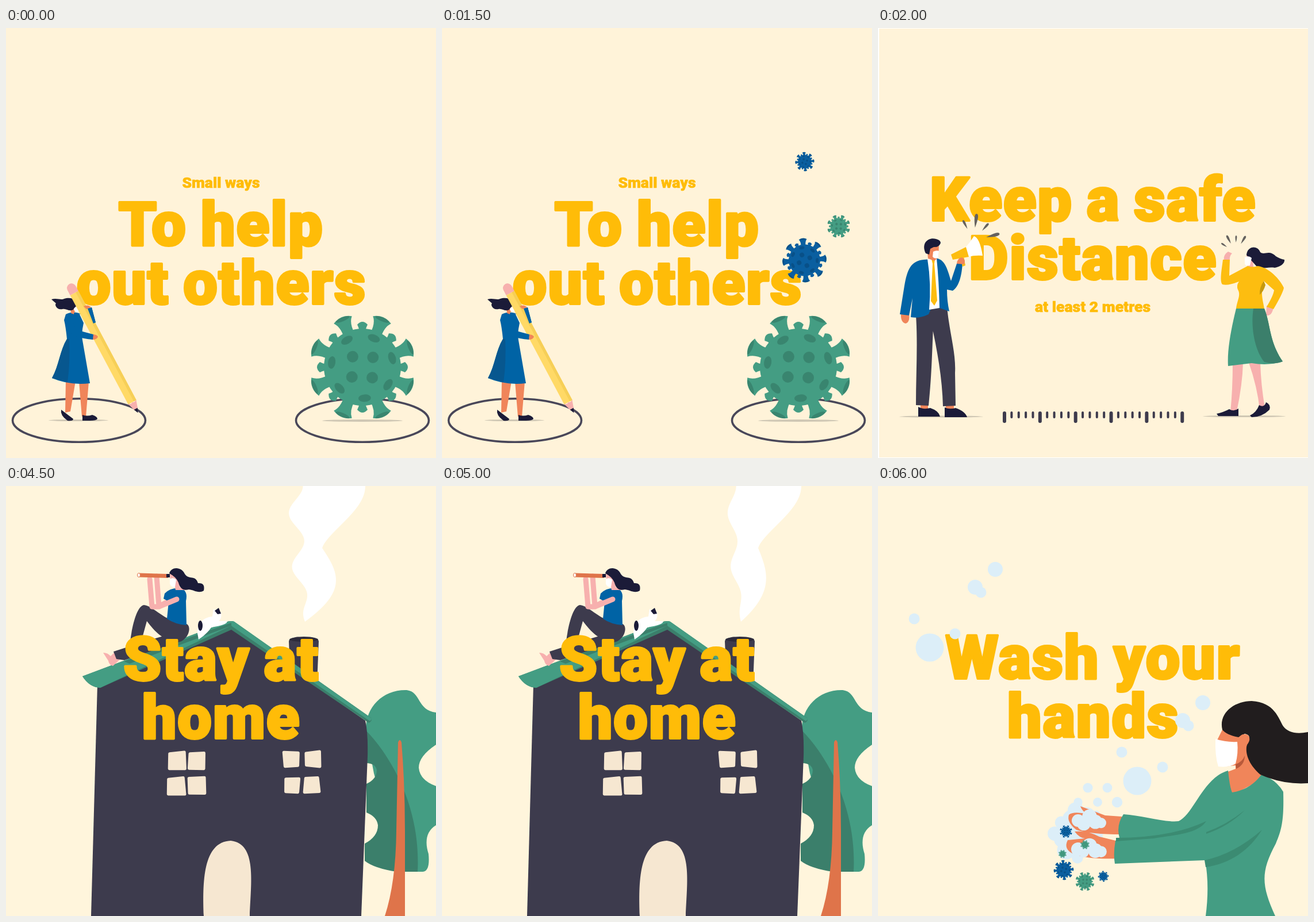
An HTML page that plays this animation: 748x748 px, repeating every 8000 ms.

```html
<!DOCTYPE html>
<html lang="en">
<head>
<meta charset="utf-8">
<title>Small ways to help out others</title>
<style>
html, body { margin: 0; width: 100%; height: 100%; overflow: hidden; background: #fff3d9 }
svg { display: block; width: 100vw; height: 100vh }
text { font: 900 106px Roboto, sans-serif; letter-spacing: 1.8px; word-spacing: -4px; text-anchor: middle;
  fill: #ffbc08; stroke: #ffbc08; stroke-width: 4; stroke-linejoin: round }
.small { font-size: 26.5px; stroke-width: .7; letter-spacing: 0; word-spacing: 0 }
.n { fill: #1b1b38 } .b { fill: #0063a5 } .B { fill: #07578f } .g { fill: #449d83 } .G { fill: #3b7f6b }
.k { fill: #3d3b4d } .o { fill: #f0855a } .p { fill: #f7b0ae } .w { fill: #fff } .y { fill: #fdbd10 }
.s { fill: #cfc7b4 } .c { fill: #f6e7d1; stroke: #f6e7d1; stroke-width: 5; stroke-linejoin: round }
.foam { fill: #dceef8 } .ring { fill: none; stroke: #494759; stroke-width: 3.6 } .ray { fill: #65625f }
.blue { color: #0a5fa0 } .green { color: #449d83 }
.arm { fill: none; stroke: #f7b0ae; stroke-width: 9; stroke-linejoin: round; stroke-linecap: round }
</style>
</head>
<body>
<svg viewBox="0 0 748 748">
<defs>
  <g id="virus"></g>
  <g id="drift" class="foam">
    <circle r="24.5"/>
    <circle cx="44" cy="-24" r="9.5"/>
    <circle cx="-27" cy="-50" r="9.5"/>
    <circle cx="79" cy="-105" r="13"/>
    <circle cx="89" cy="-96" r="9.5"/>
    <circle cx="114" cy="-136" r="13"/>
  </g>
</defs>

<g class="scene">
  <rect width="748" height="748" fill="#fff3d9"/>
  <text class="small" x="374" y="277.5">Small ways</text>
  <text x="374" y="378">To help</text>
  <text x="375" y="480">out others</text>
  <ellipse class="ring" cx="127" cy="682.5" rx="115.5" ry="37.8"/>
  <ellipse class="ring" cx="620" cy="682.5" rx="115.5" ry="37.8"/>
  <ellipse class="s" cx="126" cy="682.5" rx="52" ry="1.6"/>
  <ellipse class="s" cx="620" cy="683" rx="70" ry="2"/>
  <path class="o" d="M104 614H121L112 667L103 669ZM127 615H144L139 676H132Z"/>
  <path class="n" d="M96 664L117 680Q117 684 107 683Q94 674 96 664ZM133 673Q141 676 150 673Q159 676 159 680Q157 683 146 683H133Z"/>
  <path class="B" d="M127 497L149 486L156 513L141 503Z"/>
  <path class="b" d="M104 498Q115 492 127 496L135 513Q131 530 133 543L146 618Q110 622 80 609C92 588 94 560 106 541Q104 520 101 508Z"/>
  <path class="B" d="M106 541C94 560 92 588 80 609L107 616Q112 580 110 541Z"/>
  <path class="o" d="M112 485H126V491L119 494L118 498L113 496Z"/>
  <path class="w" d="M117 487Q123 483 129 486L127 493Q121 495 119 492Z"/>
  <path class="n" d="M79 472C88 469 96 474 101 471C112 467 127 472 128 483Q121 482 117 490C109 494 105 487 98 489C88 491 84 481 87 479Z"/>
  <g transform="translate(229.5 669.5) rotate(-28)">
    <path fill="#ffd966" d="M-8-21V-236H8V-21Z"/>
    <path fill="#f6cf57" d="M3-21V-236H8V-21Z"/>
    <path class="p" d="M-8-236V-246A8 8 0 0 1 8-246V-236ZM-8-22Q-4-18 0-21Q4-18 8-22L3-6H-3Z"/>
    <path class="n" d="M-3.5-8H3.5L0 0Z"/>
  </g>
  <path class="o" d="M135 484Q143 480 148 486L140 489ZM150 533Q158 533 160 537Q158 543 149 542Z"/>
  <path class="b" d="M142 488L149 486L156 512L152 514ZM103 502C112 500 118 515 122 525L152 533L151 542Q118 539 110 529Z"/>
  <use href="#virus" class="green" transform="translate(620 590)"/>
  <use href="#virus" class="pop blue" transform="translate(630.5 404) rotate(18) scale(.41)"/>
  <use href="#virus" class="pop green" transform="translate(690 345) scale(.215)"/>
  <use href="#virus" class="pop blue" transform="translate(631 232.5) rotate(18) scale(.178)"/>
</g>

<g class="scene">
  <rect width="748" height="748" fill="#fff"/>
  <rect x="2" y="1" width="746" height="746" fill="#fff3d9"/>
  <text x="374" y="335">Keep a safe</text>
  <text x="374" y="437">Distance</text>
  <text class="small" x="373.5" y="494">at least 2 metres</text>
  <g id="rays"></g>
  <g id="ruler" stroke="#3d3b4d" stroke-linecap="round"></g>
  <ellipse class="s" cx="110" cy="676" rx="73" ry="1.6"/>
  <ellipse class="s" cx="637" cy="675.5" rx="72" ry="1.6"/>
  <path class="o" d="M74 655H87V664H74ZM118 655H132V664H118ZM40 497H54Q56 512 48 514Q39 512 40 497Z"/>
  <path class="k" d="M65 488H98C94 540 95 590 88 657L66 656C66 600 70 540 65 488ZM90 487L120 484C124 530 136 565 134 600L135 657L113 658C112 610 103 560 92 510Z"/>
  <path class="n" d="M70 659Q78 664 91 661Q106 666 108 676H70ZM116 660Q124 664 135 661Q152 667 155 677H116Z"/>
  <path class="b" d="M80 403C57 405 51 420 46 448L38 498L54 500L60 470L57 503Q72 506 88 498L92 489L107 487L124 493Q120 475 120 455L130 457C141 450 146 430 147 408L137 410L127 440C121 420 117 405 104 401Z"/>
  <path class="w" d="M86 402L102 401Q106 440 107 487L89 490Q93 445 86 402Z"/>
  <path class="y" d="M93 402H99L98 410L103 474L98 483L92 475L95 410Z"/>
  <path class="o" d="M85 378H106L105 399L98 405L87 401Z"/>
  <path class="n" d="M83 392C74 373 89 363 101 367Q109 369 109 374Q106 382 97 381L91 384L89 394Z"/>
  <path class="w" d="M96 389Q102 386 106 388L105 400Q98 402 95 398ZM152 382Q160 373 167 362Q177 365 182 396Q168 395 157 398Z"/>
  <path class="y" d="M127 394L153 381L158 398L130 403ZM143 399L149 397L152 413L147 415Z"/>
  <path class="o" d="M137 410Q138 400 146 399Q153 402 150 411Z"/>
  <path class="p" d="M617 582H635Q634 620 624 667L613 668Q617 630 617 582ZM645 582H665Q666 620 673 661L664 664Q660 625 645 582ZM602 405Q600 395 609 389L616 392Q611 396 612 405ZM676 483L688 486Q685 502 675 500ZM641 395H652L653 418H643Z"/>
  <path class="n" d="M589 671Q602 668 611 663Q619 668 627 662V675H592ZM647 674Q658 669 663 656Q672 661 675 651Q684 655 681 664Q668 677 650 677Z"/>
  <path class="n" d="M641 395C642 379 660 377 665 390C672 396 680 385 692 397Q700 402 707 403C708 411 697 416 690 417C675 415 665 422 658 414Z"/>
  <path class="w" d="M638 399Q645 395 650 400L647 413Q640 415 638 410Z"/>
  <path class="y" d="M643 414Q652 417 660 414C680 416 700 438 706 452Q704 462 688 489L676 485Q688 465 689 456L671 440C664 462 671 478 672 489H623C624 475 632 465 626 455Q623 448 628 441Q608 449 599 446C594 440 598 420 600 403H612L611 431Z"/>
  <path fill="#c6990f" d="M671 440L674 447Q671 458 664 464Q663 452 671 440Z"/>
  <path class="g" d="M623 488H672C683 515 680 545 704 580Q680 588 650 583L609 588C607 560 615 520 623 488Z"/>
  <path class="G" d="M653 488H672C683 515 680 545 704 580Q690 586 672 581C655 560 648 520 653 488Z"/>
</g>

<g class="scene">
  <rect width="748" height="748" fill="#fff5dc"/>
  <path class="g" d="M626 425C625 385 655 354 697 355C722 358 715 390 748 394V450Q718 470 718 490Q720 512 748 522V590Q724 605 735 640Q738 670 725 671H690L640 500Z"/>
  <path class="G" d="M716 671H680Q640 665 624 652V622Q647 610 647 590Q645 575 627 568V518Q645 510 645 494Q643 483 628 482L626 425C670 470 722 560 716 671Z"/>
  <path fill="#df744a" d="M682 446Q685 438 688 446Q694 520 694 600V748H659Q678 690 679 600Z"/>
  <path id="smoke" class="w"/>
  <path class="k" d="M492 270Q493 262 518 262Q543 262 544 270L541 345L494 315Z"/>
  <ellipse cx="518" cy="267" rx="25" ry="4" fill="#2d2b3b"/>
  <path class="k" d="M159 346L391 245L625 408Q630 430 629 470L618 748H148Z"/>
  <path class="G" d="M133 331L385 236Q393 234 397 236L636 404Q637 409 631 412L392 250L164 351Q145 350 133 331Z"/>
  <path class="g" d="M133 331L388 235L394 242L164 351Q145 350 133 331ZM388 236Q394 234 397 236L637 405L633 409L393 244Z"/>
  <path class="G" d="M205 305L340 256L392 238V243L215 309Z"/>
  <path id="panes" class="c"/>
  <path fill="#f6e7d1" d="M344 748C342 690 342 619 391 617C437 622 426 690 424 748Z"/>
  <path class="p" d="M169 290Q177 290 182 296L190 288L198 302L186 313Q179 311 178 304Z"/>
  <path class="k" d="M284 258L305 270L206 303L192 301L187 288Q235 272 284 258Z"/>
  <path class="k" d="M281 230L314 240C322 243 320 262 305 270C285 275 265 262 245 235L234 275L216 270C220 240 228 209 240 207C252 208 268 224 281 230Z"/>
  <path class="arm" d="M250 162L254 210H266M262 157L266 209L294 195"/>
  <path d="M231 155L282 156.5" stroke="#df744a" stroke-width="7"/>
  <path class="n" d="M279 153H285V159H279Z"/>
  <ellipse class="w" cx="231" cy="155" rx="2.5" ry="3.5" stroke="#df744a"/>
  <path class="b" d="M276 187Q286 176 305 178Q317 183 313 200L314 242Q295 241 280 231L283 201L274 196Z"/>
  <path class="arm" d="M268 209L297 197"/>
  <path class="p" d="M285 153L300 156L302 176L313 181H295L294 176L287 172Z"/>
  <path class="n" d="M284 152C288 139 306 141 311 153C318 164 330 154 334 169Q347 168 344 182C335 188 325 180 318 180Q304 184 300 168Q296 158 284 152Z"/>
  <path class="w" d="M285 162Q291 158 296 163L294 176Q287 176 285 170Z"/>
  <path class="w" d="M333 256Q333 230 359 227L361 214L374 220Q376 230 370 235H384Q388 241 357 246Q350 257 335 267Z"/>
  <path class="n" d="M363 217L370 212L374 222L368 223Z"/>
  <ellipse class="n" cx="338" cy="243" rx="4" ry="9"/>
  <text x="374.5" y="338">Stay at</text>
  <text x="374.5" y="438.5">home</text>
</g>

<g class="scene">
  <rect width="748" height="748" fill="#fff5dc"/>
  <text x="374" y="335">Wash your</text>
  <text x="374.5" y="436.5">hands</text>
  <use href="#drift" x="90" y="281"/>
  <use href="#drift" x="451" y="513"/>
  <g id="suds" class="foam"></g>
  <path class="o" d="M424 575L395 573L352 557Q355 566 365 571Q340 565 332 572Q328 585 345 598Q370 606 424 606ZM418 618L385 610Q365 599 342 601Q350 612 360 613L330 616Q322 632 340 640Q365 650 418 648Z"/>
  <g id="lather" class="foam"></g>
  <path class="o" d="M602 418L589 444Q590 480 602 488L622 486V492L606 498L612 540L672 508Q640 475 650 438L625 430Z"/>
  <path fill="#b9593a" d="M622 484Q634 480 638 469Q638 485 623 492Z"/>
  <path class="g" d="M609 495Q612 525 616 533Q648 528 667 502Q692 510 705 532C706 575 704 595 692 622C665 672 667 695 691 748H570Q577 695 569 651L412 657Q409 640 413 617L420 612Q414 590 427 571C460 573 500 586 523 583C550 570 565 508 609 495Z"/>
  <path fill="#3b8b72" d="M414 612Q510 612 571 583C555 607 510 607 480 613L414 618ZM568 651Q620 640 668 598C645 635 612 657 570 663ZM571 602Q605 590 638 564Q610 592 571 605Z"/>
  <path fill="#211d1e" d="M599 424C592 395 620 374 650 374C690 376 697 405 705 418Q717 434 748 428V517Q705 520 665 502C640 480 638 458 643 447Q651 433 638 431L627 437Q606 433 599 424Z"/>
  <path class="o" d="M628 437Q634 429 643 433Q650 440 642 450L638 460L628 458Z"/>
  <path class="w" d="M587 440Q605 446 625 445Q627 465 622 483Q612 490 592 488Q586 470 587 440Z"/>
  <use href="#virus" class="blue" transform="translate(327 601) scale(.118)"/>
  <use href="#virus" class="green" transform="translate(360 624) scale(.085)"/>
  <use href="#virus" class="green" transform="translate(321 640) scale(.075)"/>
  <use href="#virus" class="blue" transform="translate(323 668) rotate(18) scale(.185)"/>
  <use href="#virus" class="green" transform="translate(360 688) scale(.177)"/>
  <use href="#virus" class="blue" transform="translate(392 679) rotate(18) scale(.1)"/>
</g>
</svg>
<script>
const $ = id => document.getElementById(id);
const all = sel => [...document.querySelectorAll(sel)];
const range = n => [...Array(n).keys()];
const draw = (id, n, part) => $(id).innerHTML += range(n).map(part).join('');
const circle = (x, y, r) => `<circle cx="${x}" cy="${y}" r="${r}"/>`;
const random = i => { const v = Math.sin(i * 12.9898 + 4) * 43758.5453; return v - Math.floor(v); };
const { sin, cos, sqrt, PI } = Math;

// Virus: wide and narrow spikes in turn, a round body, spots in two rings
const spike = (end, half, root) =>
  `M60-${root}Q${end - 15}-${root - 2} ${end - 5}-${half}Q${end + 5} 0 ${end - 5} ${half}Q${end - 15} ${root - 2} 60 ${root}Z`;
draw('virus', 8, i => `<g transform="rotate(${i * 45 + 22.5})">
  <path fill="currentColor" d="${spike(94, 17, 10)}"/>
  <ellipse cx="90" rx="3.5" ry="13" opacity=".15"/>
  <path fill="currentColor" transform="rotate(22.5)" d="${spike(79, 9, 6)}"/></g>`);
$('virus').innerHTML += '<circle r="67" fill="currentColor"/>';
draw('virus', 7, i => `<ellipse transform="rotate(${i * 360 / 7 - 17})" cx="54" rx="6.5" ry="11" opacity=".15"/>`);
draw('virus', 4, i => `<circle transform="rotate(${i * 90 + 47})" cx="25" r="10" opacity=".15"/>`);

// Shout marks: two fans of four petals
const petal = (x, y, turn, gap, l) =>
  `<path class="ray" transform="translate(${x} ${y}) rotate(${turn})" d="M${gap} 0q${l} ${-l / 4} ${l} 0q0 ${l / 4} ${-l} 0"/>`;
draw('rays', 4, i => petal(166, 370, 34 * i - 117, 23, i % 2 ? 24 : 17));
draw('rays', 4, i => petal(622, 391, 29 * i - 146, 18, i % 2 ? 16 : 12));

draw('ruler', 26, i => {
  const big = i % 5 == 0, w = big ? 6 : 4;
  return `<path stroke-width="${w}" d="M${220 + i * 12.37} ${667 + w / 2}V${(big ? 687 : 679) - w / 2}"/>`;
});

// Crooked window panes, four to a window
const corner = (x, y) => `${x + 4 * random(x + y) - 2} ${y + 4 * random(x - y) - 2}`;
$('panes').setAttribute('d', range(8).map(i => {
  const x = (i < 4 ? 284 : 485) + i % 2 * 36, y = 464 + (i >> 1) % 2 * 45, s = i < 4 ? 26 : 23;
  return `M${corner(x, y)}L${corner(x + s, y)}L${corner(x + s, y + s)}L${corner(x, y + s)}Z`;
}).join(''));

// Foam: a spiral pile, a few loose bubbles and a clump on each palm
draw('suds', 20, i => {
  const d = 45 * sqrt(i / 20), a = i * 2.4;
  return circle(349 + d * cos(a), 603 + d * sin(a), 8 + 8 * random(i));
});
draw('suds', 5, i => circle(348 + 17 * i, i % 2 ? 525 : 550, 6 + 4 * random(i)));
draw('lather', 10, i => {
  const k = i >> 1;
  return circle(348 + 10 * k, (i % 2 ? 632 : 582) + 7 * sin(k * 2.2), 8 + 5 * random(i + 3));
});

// Smoke outline: wavy left edge down, necked right edge back up
function smoke(sway) {
  const tip = 236, neck = 108;
  const left = y => {
    const x = 504 + .7 * sway * cos(2 * PI * y / 95) + 14 * (y / tip) ** 2;
    return x + (520 - x) * (y / tip) ** 6;
  };
  const right = y => {
    if (y < neck) return 550 + 75 * ((1 + cos(PI * y / neck)) / 2) ** .7;
    const s = (y - neck) / (tip - neck);
    return 550 - 30 * s ** 3 + 1.5 * sway * sin(PI * s);
  };
  const ys = range(60).map(i => i * 4);
  return 'M' + [...ys.map(y => [left(y), y]), ...ys.reverse().map(y => [right(y), y])].join('L') + 'Z';
}

const scenes = all('.scene'), pops = all('.pop');
const show = (el, on) => el.style.display = on ? '' : 'none';

function frame() {
  const t = performance.now() % 8000;
  scenes.forEach((s, i) => show(s, i == Math.floor(t / 2000)));
  pops.forEach((p, i) => show(p, t >= 500 * (i + 1)));
  $('smoke').setAttribute('d', smoke(t % 1000 < 500 ? 11 : 18));
  requestAnimationFrame(frame);
}
frame();
</script>
</body>
</html>
```
